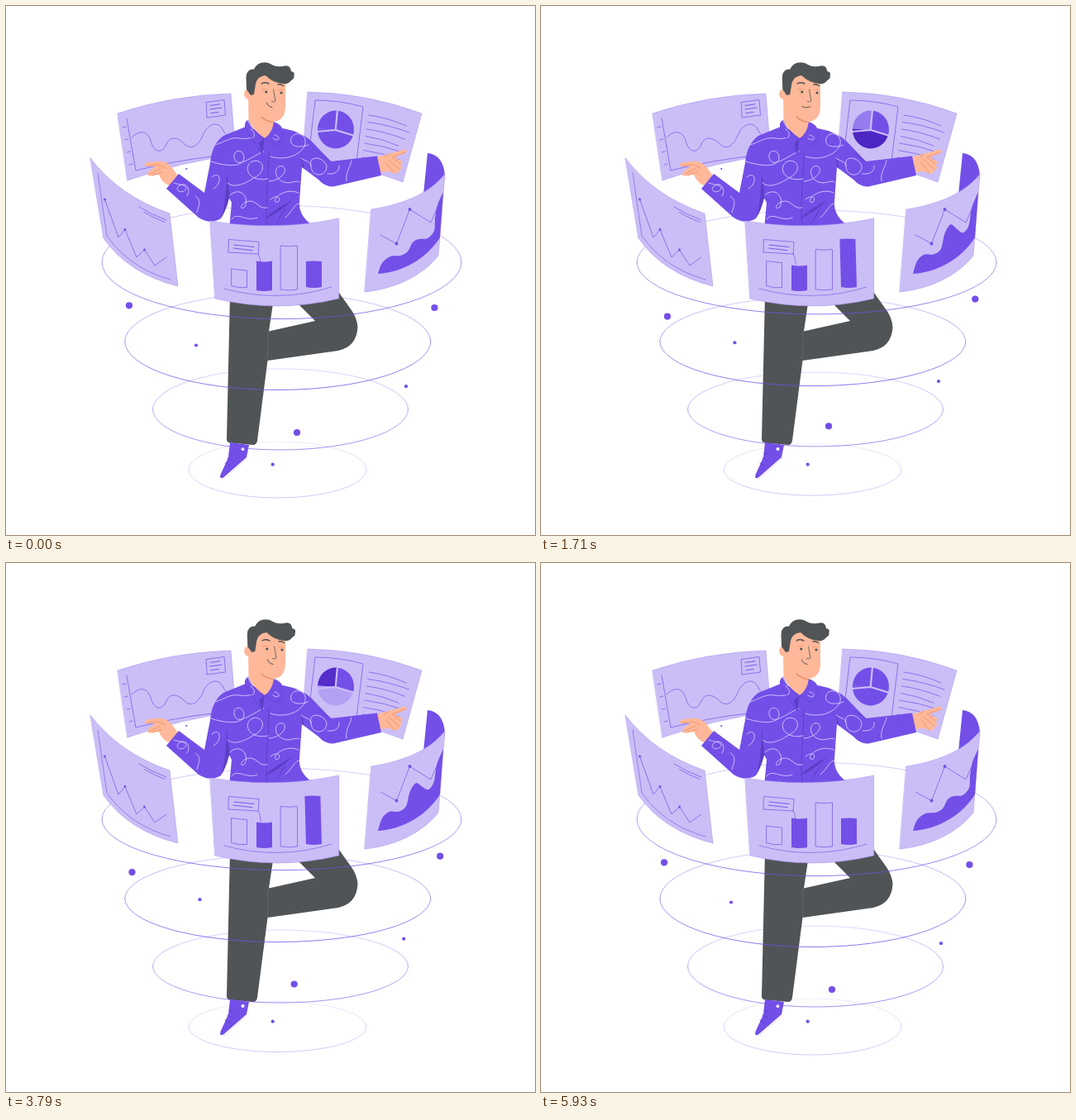
An HTML page with a canvas for the animation above (6000 ms loop, 640 px wide and 640 px high).

```html
<!DOCTYPE html>
<html lang="en">
<head>
<meta charset="utf-8">
<title>Floating screens</title>
<style>
html, body { margin: 0; width: 100%; height: 100%; overflow: hidden; background: #fff; }
canvas { display: block; width: 640px; height: 640px; }
</style>
</head>
<body>
<canvas id="stage"></canvas>
<script>
const canvas = document.getElementById('stage');
const ctx = canvas.getContext('2d');
const dpr = window.devicePixelRatio || 1;
canvas.width = canvas.height = 640 * dpr;

const LOOP = 6000;
const PURPLE = '#734fe8', LILAC = '#cbbef6', FOLD = '#5d3dc6', INK = '#505456';
const SKIN = '#ffb899', SKIN_LINE = '#e8875f', PALE = '#e2dafc';

const cache = {};
const path = d => cache[d] || (cache[d] = new Path2D(d));

function fill(d, color) {
  ctx.fillStyle = color;
  ctx.fill(path(d));
}

function line(d, color = PURPLE, width = 0.7) {
  ctx.strokeStyle = color;
  ctx.lineWidth = width;
  ctx.stroke(path(d));
}

function dot(x, y, r, color = PURPLE) {
  ctx.fillStyle = color;
  ctx.beginPath();
  ctx.arc(x, y, r, 0, 7);
  ctx.fill();
}

function panel(d) {
  fill(d, LILAC);
  line(d, '#a48df0', 0.5);
}

const mix = (a, b, k) => a + (b - a) * k;
const span = (t, a, b) => Math.min(1, Math.max(0, (t - a) / (b - a)));
const sine = (t, a, b) => (1 - Math.cos(Math.PI * span(t, a, b))) / 2;
const hump = (t, a, b, c, d) => sine(t, a, b) - sine(t, c, d);
const burst = (t, out, back) =>
  t < 2900 ? 1 - (1 - span(t, 0, 2900)) ** out : 1 - span(t, 2900, 5930) ** back;

function tint(k) {
  const base = [115, 79, 232], end = k > 0 ? [180, 160, 243] : [76, 37, 194];
  return `rgb(${base.map((v, i) => Math.round(mix(v, end[i], Math.abs(k)))).join()})`;
}

// Rings: centre x, centre y, radii, strength of the line
const rings = [
  [333.5, 310, 217.5, 68.6, 0.95],
  [328.8, 406, 185, 58.5, 1],
  [332, 488, 154.5, 49, 0.8],
  [328.5, 561, 107.5, 34, 0.4]
];

function drawRings(t, front) {
  const squash = 1 - 0.13 * hump(t, 0, 2900, 2900, 5800);
  for (const [x, y, rx, r, a] of rings) {
    const ry = r * squash;
    const g = ctx.createLinearGradient(0, y - ry, 0, y + ry);
    g.addColorStop(0, `rgba(115,79,232,${a * 0.35})`);
    g.addColorStop(0.5, `rgba(115,79,232,${a * 0.7})`);
    g.addColorStop(1, `rgba(115,79,232,${a})`);
    ctx.strokeStyle = g;
    ctx.lineWidth = 0.8;
    ctx.beginPath();
    ctx.ellipse(x, y, rx, ry, 0, front ? 0 : Math.PI, front ? Math.PI : 2 * Math.PI);
    ctx.stroke();
  }
}

function drawDots(t) {
  const go = (x, y, dx, dy, r, k) => dot(x + dx * k, y + dy * k, r);
  go(149, 362.3, 4, 13.5, 4.1, burst(t, 4.4, 1.7));
  go(518.4, 365, 7.5, -11.4, 4.1, burst(t, 2.8, 1.9));
  go(352, 516, -4, -7.8, 4.1, burst(t, 5.5, 1.45));
  go(230, 410.5, 5, -3.7, 2.1, hump(t, 0, 2200, 3500, 4900));
  go(484, 460.2, -3.8, -7.6, 2.1, hump(t, 0, 2400, 2750, 5700));
  dot(322.7, 554.7, 2.1);
  dot(218.3, 197, 1.1);
}

function wavePanel() {
  panel('M135 130Q200 108 272 106L278 180Q210 189 147 211Z');
  line('M146 136L157 199Q205 187 250 182');
  line('M152 159C161 150 171 150 175 163C179 178 189 179 194 167C199 156 209 160 215 166C225 176 233 168 238 157C243 143 256 138 262 149C266 158 271 159 275 155');
  line('M242.500 116.500L264 113.500L265.500 132L243.500 135Z');
  line('M247 120.500L259 118.700M247 125L261 123M248 129.700L257 128.400', PURPLE, 0.9);
  for (let i = 0; i < 4; i++) {
    const x = 141 + i * 2.7, y = 147 + i * 15;
    line(`M${x} ${y}l4 -1`);
  }
}

function piePanel(t) {
  panel('M365 104Q435 105 503 130L480 213Q420 190 359 183Z');
  line('M368 165L374 114Q404 114 432 122L424 188');
  const side = hump(t, 0, 1200, 1250, 2450) - hump(t, 2300, 3700, 3800, 5400);
  const low = 1.25 * hump(t, 2700, 3900, 3950, 5800) - hump(t, 0, 1300, 1600, 2700);
  const slice = (a, b, color) => {
    ctx.fillStyle = color;
    ctx.beginPath();
    ctx.moveTo(399, 150);
    ctx.ellipse(399, 149.5, 22, 23, 0, a, b);
    ctx.fill();
  };
  slice(-1.52, 0.28, PURPLE);
  slice(0.28, 3.2, tint(Math.min(1, low)));
  slice(3.2, 4.763, tint(side * 0.8));
  line('M401 125.500L398.700 150L376 152M398.700 150L421.500 157', LILAC, 2.2);
  for (let i = 0; i < 7; i++) {
    const x = 439 - i * 1.3, y = 132 + i * 8.5, w = [45, 50, 46, 40, 47, 43, 34][i];
    line(`M${x} ${y}q${w / 2} 3 ${w} ${13 - i * 0.4}`);
  }
}

function linePanel() {
  panel('M102 184Q137 230 198 251L208 339Q148 324 118 281Z');
  line('M111 202L122 278Q149 317 199 331', PURPLE, 0.6);
  line('M119.500 234L136 280L144 270.500L158 304L167.500 295L180 314L194 304');
  line('M161 243Q177 253 194 259M167 249.500Q180 257 192 261.500');
  dot(119.500, 234, 1.4);
  dot(144, 270.500, 1.4);
  dot(167.500, 295, 1.4);
}

const calm = [[450, 324], [455, 311], [465, 303], [477, 302], [486, 297], [492, 286],
  [500, 282], [510, 281], [518, 272], [519, 258], [522, 241], [529, 225]];
const peak = [[450, 324], [455, 308], [463, 300], [474, 300], [483, 293], [487, 272],
  [494, 258], [501, 266], [508, 275], [517, 268], [521, 245], [529, 225]];

function areaPanel(t) {
  fill('M510 178Q529 180 531 205L526 240L505 228Z', PURPLE);
  panel('M442 246C475 241 511 229 531 203L523 302C504 326 472 342 434 346Z');
  const k = hump(t, 0, 2600, 3000, 5000);
  const pts = calm.map((p, i) => [mix(p[0], peak[i][0], k), mix(p[1], peak[i][1], k)]);
  ctx.beginPath();
  ctx.moveTo(...pts[0]);
  for (let i = 0; i < pts.length - 1; i++) {
    const a = pts[Math.max(0, i - 1)], b = pts[i], c = pts[i + 1], d = pts[Math.min(i + 2, pts.length - 1)];
    ctx.bezierCurveTo(b[0] + (c[0] - a[0]) / 6, b[1] + (c[1] - a[1]) / 6,
      c[0] - (d[0] - b[0]) / 6, c[1] - (d[1] - b[1]) / 6, c[0], c[1]);
  }
  ctx.lineTo(525, 280);
  ctx.bezierCurveTo(510, 304, 482, 322, 450, 324);
  ctx.fillStyle = PURPLE;
  ctx.fill();
  line('M453 277L472.500 287.500L488.500 246L514 262L528 230');
  dot(472.500, 287.500, 1.9);
  dot(488.500, 246, 1.9);
}

function barPanel(t) {
  panel('M247 260Q326 273 402.700 257L402.700 354Q328 372 253 354Z');
  line('M264 342Q330 360 394 340', PURPLE, 0.6);
  line('M270 282.500L306 285.500L305.200 300L269.200 298Z');
  line('M276 289L300 291.500M275 293L298 295.700', PURPLE, 0.9);
  line('M305 300Q308 304 308 313', PURPLE, 0.7);
  const k = hump(t, 0, 1150, 4200, 5800);
  const bar = (x, top, w, base, solid, lean = 0) => {
    const l = x + lean, b = solid ? 2 : 1.5;
    ctx.beginPath();
    ctx.moveTo(l, top);
    ctx.quadraticCurveTo(l + w / 2, top + (x > 350 ? -1 : b), l + w, top + (x < 300 ? 2 : 0));
    ctx.lineTo(x + w, base);
    ctx.quadraticCurveTo(x + w / 2, base + b, x, base - (x < 300 ? 2 : 0));
    ctx.closePath();
    ctx.fillStyle = ctx.strokeStyle = PURPLE;
    ctx.lineWidth = 0.7;
    solid ? ctx.fill() : ctx.stroke();
  };
  bar(273, mix(318, 308.5, k), 18.5, 340.5, false);
  bar(303, mix(308.5, 313.5, k), 19, 344, true);
  bar(332.5, mix(290, 294.5, k), 20, 343, false);
  bar(363, mix(309, 282, k), 19, 340, true, -1.6 * k);
}

function drawLegs() {
  fill('M271 350L267 524Q267 528 271 528.500L299 531Q303 531 304 526L316.500 429L402 417Q424 412 425.500 389Q425 378 418 368L403 347L340 347L374 381L318 393.500L324.500 350Z', INK);
  line('M317 393.500L316.500 429', '#72777a', 0.5);
  fill('M271 528L294 531L291 546L263 570.500Q258 573 259.500 567L269 546Z', PURPLE);
  line('M264 572L292 547', '#dcd3fb', 0.8);
  line('M270 541l6 2M268 547l6 3M265 553l6 3', FOLD, 0.8);
  dot(286.500, 536, 2, '#fff');
}

function drawHands() {
  fill('M209 207L202 197Q194 186 182 188L170 189.500Q165 192 170 194L181 194L173 200Q168 206 175 205.500L185 204Q188 213 197 217Z', SKIN);
  line('M170 193.500L184 192L193 196M174 203L187 197M177 205L189 201', SKIN_LINE, 0.7);
  fill('M448 183L463 179L482 173.500Q487 174 483 178L470 183L478 187Q482 190 477 192Q482 197 476 198Q476 203 470 202.500L463 200L452 201Z', SKIN);
  line('M483 177L467 183L477 191M463 186L476 198M460 190L470 202M463 179L458 183', SKIN_LINE, 0.7);
}

const shirt = 'M290 146L263 157Q249 167 247 190L240 226L209 203L194 221L233 256Q247 265 260 257Q266 248 270 232L273 238L270 270L368 270L369 264Q354 253 355 237L358 195L378 210Q386 219 396 218.500L454 205L449 181.500L393 188L370 164Q357 152 335 148L313 153Z';
const swirls = [
  'M248 188C262 193 288 197 288 183C287 171 272 174 277 186C282 196 299 181 312 176',
  'M253 168C264 165 271 158 283 160C296 163 300 153 309 166',
  'M268 214C277 222 292 213 300 208C317 200 311 184 298 188C286 194 293 214 317 209',
  'M249 207C260 198 262 215 251 221',
  'M271 229C282 218 295 230 289 243C281 249 284 236 296 236C306 238 306 246 316 244',
  'M273 258C280 248 291 262 304 256',
  'M318 212C330 212 343 200 335 194C325 191 322 208 336 213C345 216 350 210 355 213',
  'M320 182C334 187 353 183 361 170C367 156 350 149 345 160C342 171 356 172 366 168',
  'M320 234C333 224 333 240 326 237C322 233 338 219 354 226M338 256C348 247 349 239 355 239',
  'M369 193C365 180 385 182 388 194C388 207 370 208 369 194C369 188 362 188 357 184',
  'M389 203C398 204 404 200 403 193M412 212C410 201 417 195 418 187',
  'M203 214C211 217 218 216 218 221C214 228 203 224 209 218C216 212 225 220 219 230',
  'M229 230C238 235 232 244 231 250'
];

function drawShirt() {
  fill(shirt, PURPLE);
  ctx.save();
  ctx.clip(path(shirt));
  fill('M267 200L271 236L261 257Q267 230 267 200Z', FOLD);
  fill('M346 235Q329 243 312 258Q331 250 346 235ZM340 243Q331 252 327 265Q333 253 340 243ZM358 195L357 180L361 198Z', FOLD);
  line('M318 177C318 210 313 236 316 268', FOLD, 0.9);
  swirls.forEach(d => line(d, PALE, 0.8));
  ctx.restore();
  line('M393 188L380 179', FOLD, 0.7);
}

function drawHead(t) {
  fill('M293 104L293.500 138Q299 151 313 160Q323 154 324 141L323 125Z', SKIN);
  fill('M297 102Q289 98 288 107Q289 114 297 113Z', SKIN);
  fill('M298 82L338 87L338 123Q337 139 323 140Q312 140 306 131L296 113Z', SKIN);
  line('M309 134Q315 140 323 140.500', SKIN_LINE, 1.2);
  fill('M292 138Q287 142 290 149L310 179L312 161Q298 152 292 138Z', PURPLE);
  fill('M324 140Q334 143 336 153Q334 163 328 168L313 160Q322 154 324 140Z', PURPLE);
  fill('M306 166L312 161L310 179Z', FOLD);
  line('M293 138Q298 152 312 161L310 179L290 149M313 160L327 169Q334 163 336 153', FOLD, 0.6);
  line('M323 160C329 165 335 159 325 156M296 149C301 152 302 157 298 160', PALE, 0.8);

  const turn = hump(t, 250, 900, 3900, 4600);
  ctx.save();
  ctx.translate(turn * 1.3, 0);
  fill('M296 108L291 101L290.500 86Q291 76 300 76.500Q305 66 318 69Q327 75 337 72.500Q344 71 345 79Q350 80 348.500 84Q349 88 345 90Q342 95 335 94Q323 93 314 84Q304 85 302 94L300 107Z', INK);
  ctx.restore();

  ctx.save();
  ctx.translate(turn, 0);
  line('M309 94Q313 91.500 318 94M329 95Q332 94 335.500 96.500', INK, 1.4);
  if (t > 2400 && t < 2680) {
    line('M310 101Q314 102 317 104.500Q313 105.500 310 104.500M336 101Q332 101 329 103.500Q333 105 336 104.500', INK, 0.7);
  } else {
    dot(314.800, 104, 1.6, INK);
    dot(333, 105, 1.6, INK);
    line('M310 101Q313 99.500 316 101M329 102Q332 100.500 335 102', SKIN_LINE, 0.6);
  }
  line('M323.500 101L326 115Q324 117 321.500 115.500', INK, 0.8);
  const smile = hump(t, 450, 800, 3250, 3650);
  ctx.strokeStyle = INK;
  ctx.lineWidth = 1;
  ctx.beginPath();
  ctx.moveTo(mix(315.5, 315, smile), mix(117, 121.5, smile));
  ctx.quadraticCurveTo(mix(317, 320, smile), mix(122, 124.5, smile), mix(322, 325, smile), mix(122.5, 121.5, smile));
  ctx.stroke();
  ctx.restore();
}

function draw(t) {
  ctx.setTransform(dpr, 0, 0, dpr, 0, 0);
  ctx.fillStyle = '#fff';
  ctx.fillRect(0, 0, 640, 640);
  ctx.lineCap = ctx.lineJoin = 'round';
  drawRings(t, false);
  wavePanel();
  piePanel(t);
  drawLegs();
  drawHands();
  drawShirt();
  drawHead(t);
  drawRings(t, true);
  linePanel();
  areaPanel(t);
  barPanel(t);
  drawDots(t);
}

const start = performance.now();
function tick() {
  draw((performance.now() - start) % LOOP);
  requestAnimationFrame(tick);
}
tick();
</script>
</body>
</html>
```
